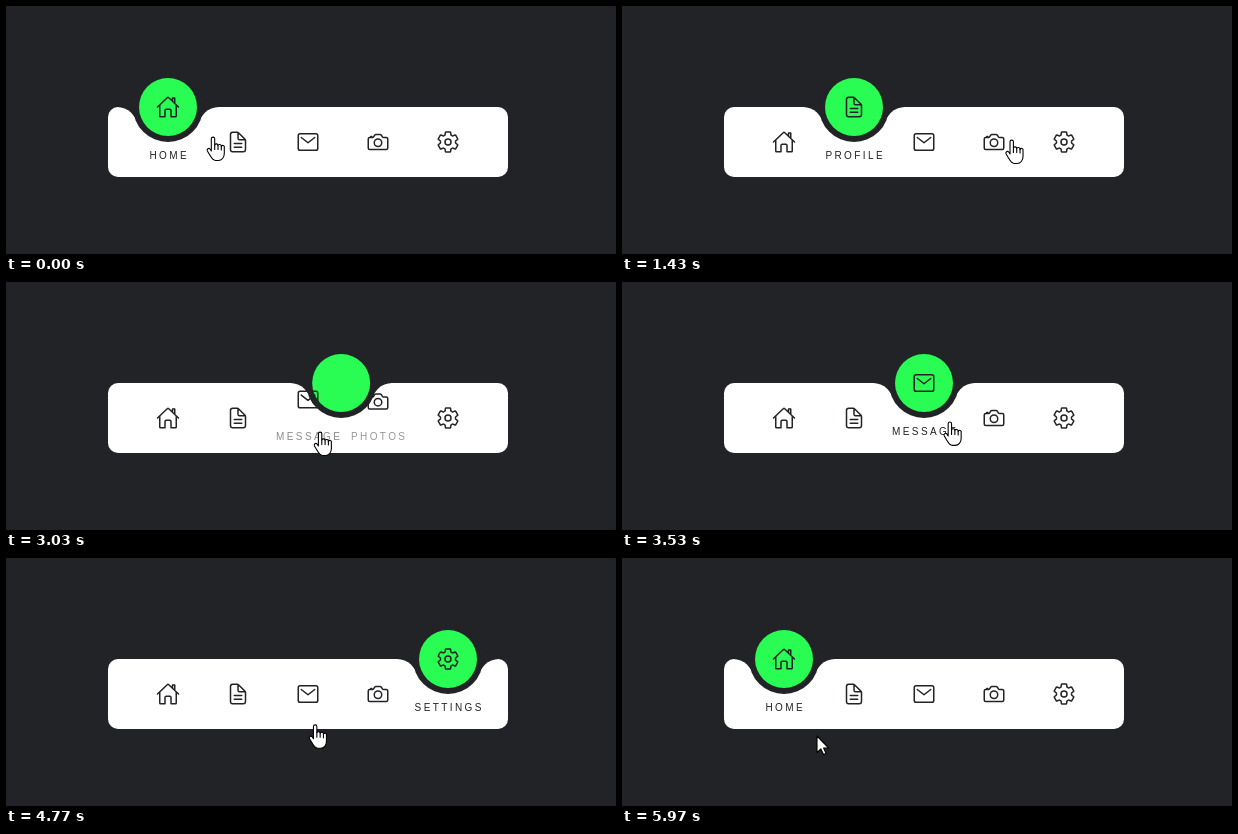
An HTML page with a canvas for the animation above (6070 ms loop, 610x248 px).

```html
<!DOCTYPE html>
<html lang="en">
<head>
<meta charset="utf-8">
<title>Navigation menu</title>
<style>
  html, body { margin: 0; width: 100%; height: 100%; overflow: hidden; background: #222327; }
  canvas { display: block; }
</style>
</head>
<body>
<canvas id="stage" width="610" height="248"></canvas>
<script>
const ctx = document.getElementById('stage').getContext('2d');
const LOOP = 6070, FRAME = 100 / 3, TRANSITION = 500;
const DARK = '#222327', GREEN = '#29fd53', WHITE = '#fff';
const BAR = { x: 102, y: 101, w: 400, h: 70 };

// Icons are drawn on a 512 unit grid
const home = new Path2D('M80 212v236a16 16 0 0016 16h96V328a24 24 0 0124-24h80a24 24 0 0124 24v136h96a16 16 0 0016-16V212M480 256L266.9 52c-5-5.3-16.7-5.3-21.8 0L32 256M400 179V64h-48v69');
const page = new Path2D('M416 221.2V416a48 48 0 01-48 48H144a48 48 0 01-48-48V96a48 48 0 0148-48h98.8a32 32 0 0122.6 9.4l141.2 141.2a32 32 0 019.4 22.6zM256 56v120a32 32 0 0032 32h120M176 288h160M176 368h160');
const mail = new Path2D('M112 160l144 112 144-112');
mail.roundRect(48, 80, 416, 352, 40);
const camera = new Path2D('M350.5 148.7l-26.6-42.1C318.3 100 310.6 96 302 96h-92c-8.6 0-16.3 4-21.9 10.6l-26.6 42.1C155.9 155.2 148.6 160 140 160H80a32 32 0 00-32 32v192a32 32 0 0032 32h352a32 32 0 0032-32V192a32 32 0 00-32-32h-59c-8.6 0-16.9-4.8-22.5-11.3zM124 158v-22h-24v22M336 272a80 80 0 11-160 0a80 80 0 11160 0z');
const gear = makeGear();

const items = [
  { label: 'HOME', icon: home },
  { label: 'PROFILE', icon: page },
  { label: 'MESSAGE', icon: mail },
  { label: 'PHOTOS', icon: camera },
  { label: 'SETTINGS', icon: gear }
];
const itemX = i => 162 + 70 * i;

// [time, selected item]
const clicks = [[-TRANSITION, 0], [880, 1], [2187, 3], [2880, 2], [3980, 4], [5350, 0]];

// [time, x, y] of the pointer tip
const pointer = [
  [0, 207, 131], [70, 207, 131], [400, 241, 134], [600, 241, 134], [670, 238, 135],
  [930, 238, 135], [1430, 389, 134], [1470, 396, 134], [1640, 414, 130], [1970, 388, 134],
  [2140, 388, 134], [2270, 372, 136], [2700, 306, 142], [2850, 306, 142], [3030, 314, 150],
  [3470, 322, 140], [3500, 323, 140], [3830, 436, 137], [3950, 436, 137], [4130, 397, 146],
  [4500, 310, 167], [4740, 310, 167], [5350, 159, 128], [5400, 160, 129], [5970, 195, 178],
  [LOOP, 195, 178]
];

const hand = new Path2D('M-1.7 14V1.8a1.7 1.7 0 013.4 0V8a1.7 1.7 0 013.3 .7a1.7 1.7 0 013.3 .8a1.5 1.5 0 013 1V16.500c0 4-2.500 7-6 7H2.500C-.5 23.500-2 20-3.500 17.500L-5.600 14C-6.600 12-4.300 10.500-3 12z');
const knuckles = new Path2D('M1.7 8v4.500M5 9v3.500M8.300 9.500v3.500');
const arrow = new Path2D('M0 0V16.500L3.900 12.900 6.500 18.500 9 17.400 6.600 12H11.700z');

function makeGear() {
  const path = new Path2D();
  const tooth = [[-61, -150, 16], [-54, -214, 11], [54, -214, 11], [61, -150, 16]];
  const points = [];
  for (let k = 0; k < 6; k++) {
    const c = Math.cos(k * Math.PI / 3), s = Math.sin(k * Math.PI / 3);
    for (const [x, y, r] of tooth) points.push([256 + x * c - y * s, 256 + x * s + y * c, r]);
  }
  path.moveTo(256, 42);
  for (let k = 2; k < points.length + 2; k++) {
    const [x, y, r] = points[k % points.length];
    const next = points[(k + 1) % points.length];
    path.arcTo(x, y, next[0], next[1], r);
  }
  path.closePath();
  path.moveTo(320, 256);
  path.arc(256, 256, 64, 0, 7);
  return path;
}

// CSS "ease": cubic-bezier(.25, .1, .25, 1)
function ease(x) {
  if (x <= 0) return 0;
  if (x >= 1) return 1;
  const bezier = (u, a, b) => 3 * u * (1 - u) ** 2 * a + 3 * u * u * (1 - u) * b + u ** 3;
  let lo = 0, hi = 1;
  for (let i = 0; i < 24; i++) {
    const mid = (lo + hi) / 2;
    if (bezier(mid, .25, .25) < x) lo = mid; else hi = mid;
  }
  return bezier(lo, .1, 1);
}

// Monotone cubic interpolation through the pointer keys
function pointerAt(t, axis) {
  const slope = i => i < 0 || i > pointer.length - 2 ? 0 :
    (pointer[i + 1][axis] - pointer[i][axis]) / (pointer[i + 1][0] - pointer[i][0]);
  const tangent = i => {
    const a = slope(i - 1), b = slope(i);
    return a * b <= 0 ? 0 : 2 * a * b / (a + b);
  };
  let i = 0;
  while (i < pointer.length - 2 && t >= pointer[i + 1][0]) i++;
  const span = pointer[i + 1][0] - pointer[i][0];
  const u = (t - pointer[i][0]) / span, v = 1 - u;
  return v * v * (1 + 2 * u) * pointer[i][axis] + u * u * (3 - 2 * u) * pointer[i + 1][axis]
    + span * u * v * (v * tangent(i) - u * tangent(i + 1));
}

function fillRound(color, x, y, w, h, radii) {
  ctx.fillStyle = color;
  ctx.beginPath();
  ctx.roundRect(x, y, w, h, radii);
  ctx.fill();
}

function fillCircle(color, x, y, r) {
  ctx.fillStyle = color;
  ctx.beginPath();
  ctx.arc(x, y, r, 0, 2 * Math.PI);
  ctx.fill();
}

function drawIndicator(x) {
  const y = BAR.y;
  fillRound(DARK, x - 50, y - 10, 20, 20, [0, 20, 0, 0]);
  fillRound(WHITE, x - 51, y, 20, 20, [0, 20, 0, 0]);
  fillRound(DARK, x + 30, y - 10, 20, 20, [20, 0, 0, 0]);
  fillRound(WHITE, x + 31, y, 20, 20, [20, 0, 0, 0]);
  fillCircle(DARK, x, y, 35);
  fillCircle(GREEN, x, y, 29);
}

function drawItem({ label, icon }, x, active) {
  ctx.save();
  ctx.translate(x - 12, 124 - 35 * active);
  ctx.scale(24 / 512, 24 / 512);
  ctx.strokeStyle = DARK;
  ctx.lineWidth = 32;
  ctx.stroke(icon);
  ctx.restore();

  if (!active) return;
  const spacing = 2.4;
  ctx.globalAlpha = active;
  ctx.fillStyle = DARK;
  ctx.font = '10px "Liberation Sans", Arial, sans-serif';
  ctx.letterSpacing = spacing + 'px';
  ctx.textAlign = 'center';
  ctx.fillText(label, x + spacing / 2, 163 - 10 * active);
  ctx.globalAlpha = 1;
}

function drawPointer(x, y) {
  const overBar = y < BAR.y + BAR.h;
  ctx.save();
  ctx.translate(x, y);
  ctx.lineWidth = 1.1;
  ctx.strokeStyle = '#000';
  ctx.fillStyle = WHITE;
  ctx.fill(overBar ? hand : arrow);
  ctx.stroke(overBar ? hand : arrow);
  if (overBar) ctx.stroke(knuckles);
  ctx.restore();
}

function draw(t) {
  let step = clicks.length - 1;
  while (step > 0 && t < clicks[step][0]) step--;
  const [start, to] = clicks[step];
  const from = clicks[Math.max(0, step - 1)][1];
  const progress = ease((t - start) / TRANSITION);

  ctx.fillStyle = DARK;
  ctx.fillRect(0, 0, 610, 248);
  fillRound(WHITE, BAR.x, BAR.y, BAR.w, BAR.h, 10);
  drawIndicator(itemX(from) + (itemX(to) - itemX(from)) * progress);
  items.forEach((item, i) => {
    const active = i === to ? progress : i === from ? 1 - progress : 0;
    drawItem(item, itemX(i), active);
  });
  drawPointer(pointerAt(t, 1), pointerAt(t, 2));
}

ctx.lineCap = ctx.lineJoin = 'round';
function tick() {
  const t = performance.now() % LOOP;
  // The picture advances thirty times a second
  draw(Math.floor((t + 4) / FRAME) * FRAME);
  requestAnimationFrame(tick);
}
tick();
</script>
</body>
</html>
```
